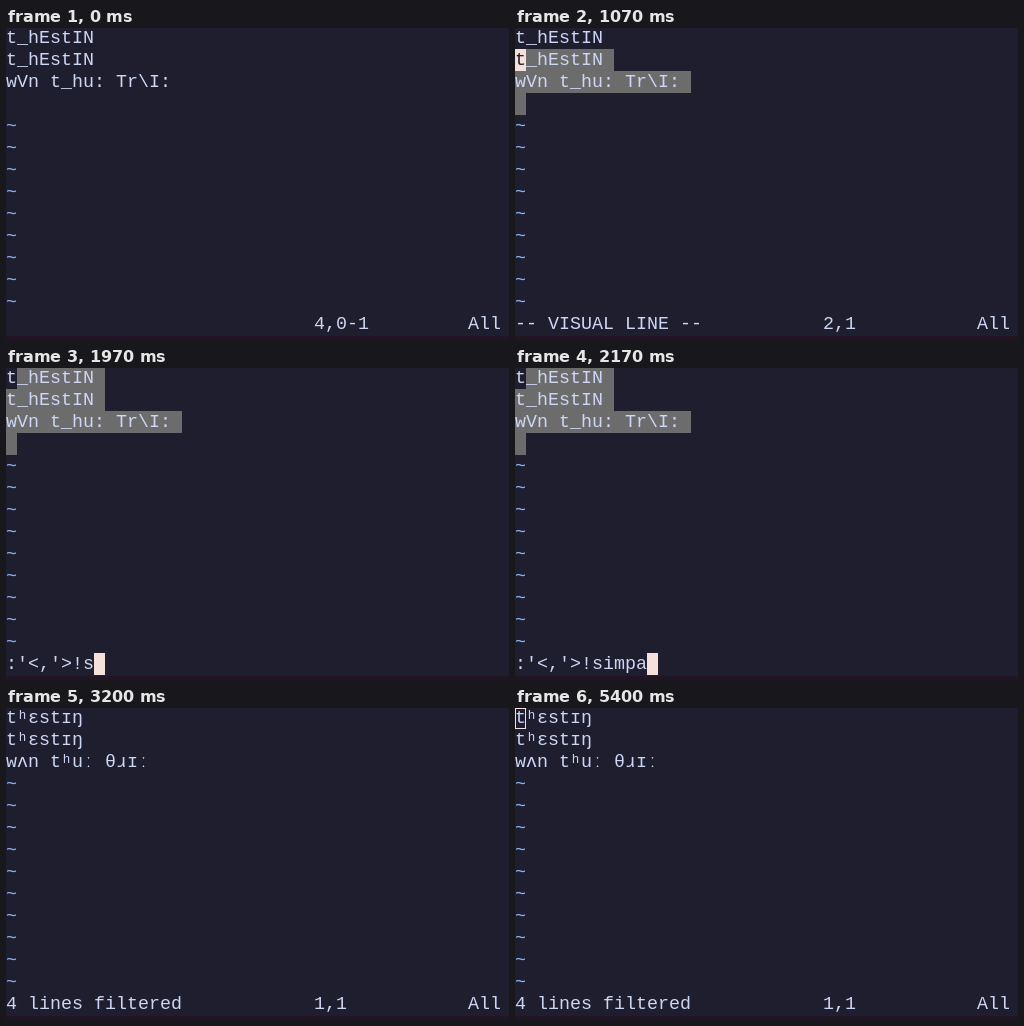
Write an HTML page that moves like this. It is 503 px wide and 312 px high and loops after 5530 ms.

```html
<!DOCTYPE html>
<html lang="en">
<head>
<meta charset="utf-8">
<title>Filtering lines in an editor</title>
<style>
html, body { margin: 0; width: 100%; height: 100%; overflow: hidden; background: #1e1e2e; }
svg { display: block; }
text {
  font: 18.333px "Liberation Mono", "DejaVu Sans Mono", monospace;
  font-variant-ligatures: none;
  white-space: pre;
}
</style>
</head>
<body>
<svg id="term" width="503" height="312" viewBox="0 0 503 312"></svg>
<script>
const LOOP = 5530, CELL = 11, ROW = 22, STATUS_ROW = 13;
const COLOR = {
  back: '#1e1e2e', text: '#cdd6f4', tilde: '#89b4fa',
  select: '#6c6c6c', cursor: '#f5e0dc', edge: '#211424'
};
const RAW = ['t_hEstIN', 't_hEstIN', 'wVn t_hu: Tr\\I:', ''];
const IPA = ['tʰɛstɪŋ', 'tʰɛstɪŋ', 'wʌn tʰuː θɹɪː'];

const normal = cursor => ({ lines: RAW, pos: '4,0-1', row: 3, cursor });
const visual = row => ({
  lines: RAW, msg: '-- VISUAL LINE --', pos: row === 3 ? '4,0-1' : `${row + 1},1`,
  row, selectFrom: row, cursor: 'block'
});
const command = typed => ({
  lines: RAW, msg: ":'<,'>" + typed, row: STATUS_ROW, col: 6 + typed.length,
  selectFrom: 0, cursor: 'block'
});
const filtered = cursor => ({
  lines: IPA, msg: '4 lines filtered', pos: '1,1', row: 0, cursor
});

const steps = [
  [0, normal('none')],
  [300, normal('block')],
  [770, visual(3)],
  [900, visual(2)],
  [1070, visual(1)],
  [1230, visual(0)],
  [1500, command('')],
  [1770, command('!')],
  [1970, command('!s')],
  [2040, command('!si')],
  [2110, command('!sim')],
  [2170, command('!simpa')],
  [2630, filtered('block')],
  [3200, filtered('none')],
  [3700, filtered('block')],
  [4200, filtered('none')],
  [4700, filtered('block')],
  [5200, filtered('none')],
  [5400, filtered('hollow')]
];

const term = document.getElementById('term');

function add(tag, attrs, content = '') {
  const el = document.createElementNS('http://www.w3.org/2000/svg', tag);
  for (const key in attrs) el.setAttribute(key, attrs[key]);
  el.textContent = content;
  term.append(el);
}

const rect = (x, y, width, height, fill) => add('rect', { x, y, width, height, fill });

const cells = (col, row, count, fill) =>
  rect(col * CELL, row * ROW - 1, count * CELL, ROW, fill);

function write(content, col, row, fill = COLOR.text) {
  if (content) add('text', { x: col * CELL, y: row * ROW + 15, fill }, content);
}

function drawCursor({ lines, row, col = 0, cursor }) {
  if (cursor === 'block') {
    cells(col, row, 1, COLOR.cursor);
    if (lines[row]) write(lines[row][col], col, row, COLOR.back);
  } else if (cursor === 'hollow') {
    add('rect', {
      x: col * CELL + 0.5, y: row * ROW + 0.5, width: CELL - 1, height: ROW - 2,
      fill: 'none', stroke: COLOR.cursor
    });
  }
}

function draw(view) {
  term.replaceChildren();
  rect(0, 0, 503, 312, COLOR.back);
  rect(0, 308, 503, 4, COLOR.edge);

  const { lines, selectFrom = Infinity } = view;
  lines.forEach((line, row) => {
    if (row >= selectFrom) {
      // The editor cursor leaves its own cell unselected in command mode.
      const skip = view.row === STATUS_ROW && row === 0 ? 1 : 0;
      cells(skip, row, line.length + 1 - skip, COLOR.select);
    }
    write(line, 0, row);
  });
  for (let row = lines.length; row < STATUS_ROW; row++) write('~', 0, row, COLOR.tilde);

  write(view.msg, 0, STATUS_ROW);
  if (view.pos) {
    write(view.pos, 28, STATUS_ROW);
    write('All', 42, STATUS_ROW);
  }
  drawCursor(view);
}

let shown = null;
const start = performance.now();

function tick() {
  const t = (performance.now() - start) % LOOP;
  const view = steps.findLast(([at]) => at <= t)[1];
  if (view !== shown) draw(shown = view);
  requestAnimationFrame(tick);
}
tick();
</script>
</body>
</html>
```
